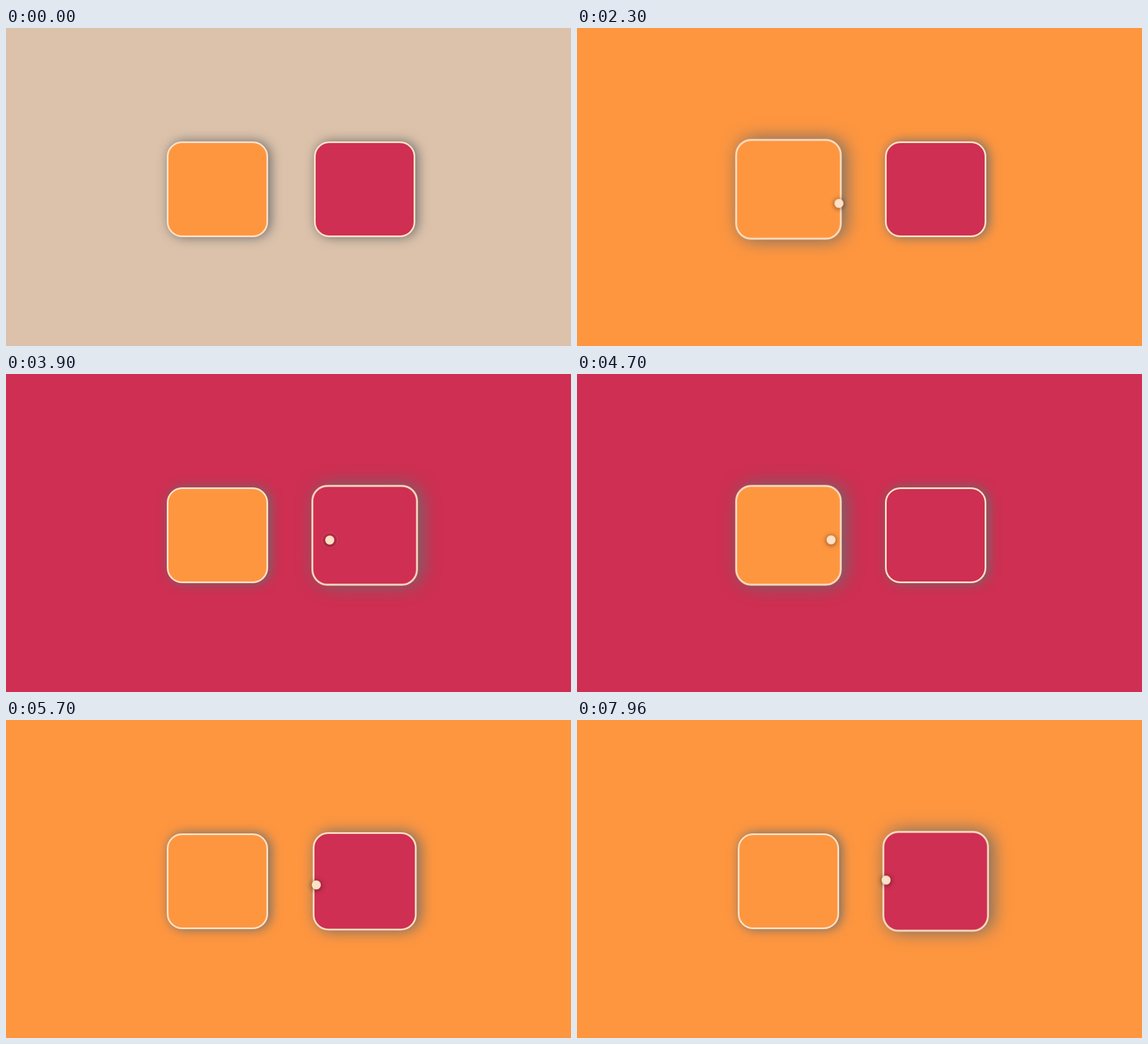
An HTML page that plays this animation: 998x561 px, repeating every 8 s.

```html
<!DOCTYPE html>
<html lang="en">
<head>
<meta charset="utf-8">
<title>Color buttons</title>
<style>
:root {
  --sand: #dcc2ab;
  --orange: #fe9640;
  --red: #ce2f52;
  --cream: #fde0c5;
  --rest: 4px 0 20px #6b6b6b;
  --hover: 6px 0 30px #6b6b6b;
  --press: 1px 0 5px #6b6b6b;
}
html, body { margin: 0; width: 100%; height: 100%; overflow: hidden; }
.stage { position: relative; width: 998px; height: 561px; overflow: hidden; background: var(--sand); }
.stage, .stage * { animation: 8s linear infinite; }
.stage { animation-name: background; }

.button {
  position: absolute;
  top: 200px;
  box-sizing: border-box;
  width: 179px;
  height: 169px;
  border: 3px solid var(--cream);
  border-radius: 27px;
}
.orange { left: 284px; background: var(--orange); animation-name: orange; }
.red { left: 543.5px; background: var(--red); animation-name: red; }

.cursor { position: absolute; left: 0; top: 0; animation-name: path; }
.dot, .ring { position: absolute; border-radius: 50%; box-sizing: border-box; }
.dot {
  left: -8px; top: -8px; width: 16px; height: 16px;
  background: var(--cream);
  box-shadow: 0 1px 10px rgba(0, 0, 0, .6);
  animation-name: dot;
}
.ring {
  left: -16px; top: -16px; width: 32px; height: 32px;
  border: 2px solid var(--cream);
  animation-name: ring;
}

@keyframes background {
  0%, 18.75% { background: var(--sand); }
  23.75%, 41.25% { background: var(--orange); }
  46.25%, 60.375% { background: var(--red); }
  65.375%, 100% { background: var(--orange); }
}
@keyframes orange {
  0%, 10.6%, 31.9%, 55.5%, 68.1%, 81%, 90.25%, 100% { scale: 1; box-shadow: var(--rest); }
  13.1%, 18.75%, 24.4%, 29.4%, 58%, 60.4%, 65.6%, 83.5%, 87.75% { scale: 1.05; box-shadow: var(--hover); }
  20.6%, 21.9%, 62.2%, 63.5% { scale: .9; box-shadow: var(--press); }
}
@keyframes red {
  0%, 34.9%, 54.25%, 70%, 77%, 92.75% { scale: 1; box-shadow: var(--rest); }
  37.4%, 41.25%, 47%, 51.75%, 72.5%, 74.5%, 95.25%, 100% { scale: 1.05; box-shadow: var(--hover); }
  43.1%, 44.5% { scale: .9; box-shadow: var(--press); }
}
@keyframes dot {
  0%, 18.75%, 24.4%, 41.25%, 47%, 60.4%, 66%, 100% { scale: 1; }
  20.6%, 21.9%, 43.1%, 44.5%, 62.2%, 63.5% { scale: .5; }
}
@keyframes ring {
  0%, 21.9%, 44.49%, 63.49% { scale: .5; opacity: 0; }
  21.91%, 44.5%, 63.5% { scale: .5; opacity: .7; }
  26.9%, 49.5%, 68.5%, 100% { scale: 1; opacity: 0; }
}
@keyframes path {
  0%, 5.875% { translate: 274px 580px; }
  10% { translate: 334px 400px; }
  13.75% { translate: 360px 326px; }
  18.75% { translate: 390px 315px; }
  22.5% { translate: 402px 313px; }
  28.75% { translate: 462.5px 309.5px; }
  35% { translate: 546px 303px; }
  41.25% { translate: 590px 297px; }
  45% { translate: 588px 294px; }
  48.75% { translate: 572px 293px; }
  51.875% { translate: 538px 293px; }
  55.625% { translate: 466px 293px; }
  60% { translate: 442px 292.5px; }
  62.875% { translate: 445px 292.5px; }
  65.625% { translate: 466px 292px; }
  70% { translate: 540px 291px; }
  72.5% { translate: 556px 291px; }
  74.375% { translate: 543px 291px; }
  77.5% { translate: 500px 290.5px; }
  80.875% { translate: 463px 290px; }
  82% { translate: 453px 290px; }
  85% { translate: 438px 289px; }
  87.5% { translate: 464px 288px; }
  92% { translate: 536px 285px; }
  92.875% { translate: 545px 284.5px; }
  96.25% { translate: 572px 283px; }
  99.5%, 100% { translate: 546px 282.5px; }
}
</style>
</head>
<body>
<div class="stage">
  <div class="button orange"></div>
  <div class="button red"></div>
  <div class="cursor">
    <div class="ring"></div>
    <div class="dot"></div>
  </div>
</div>
</body>
</html>
```
